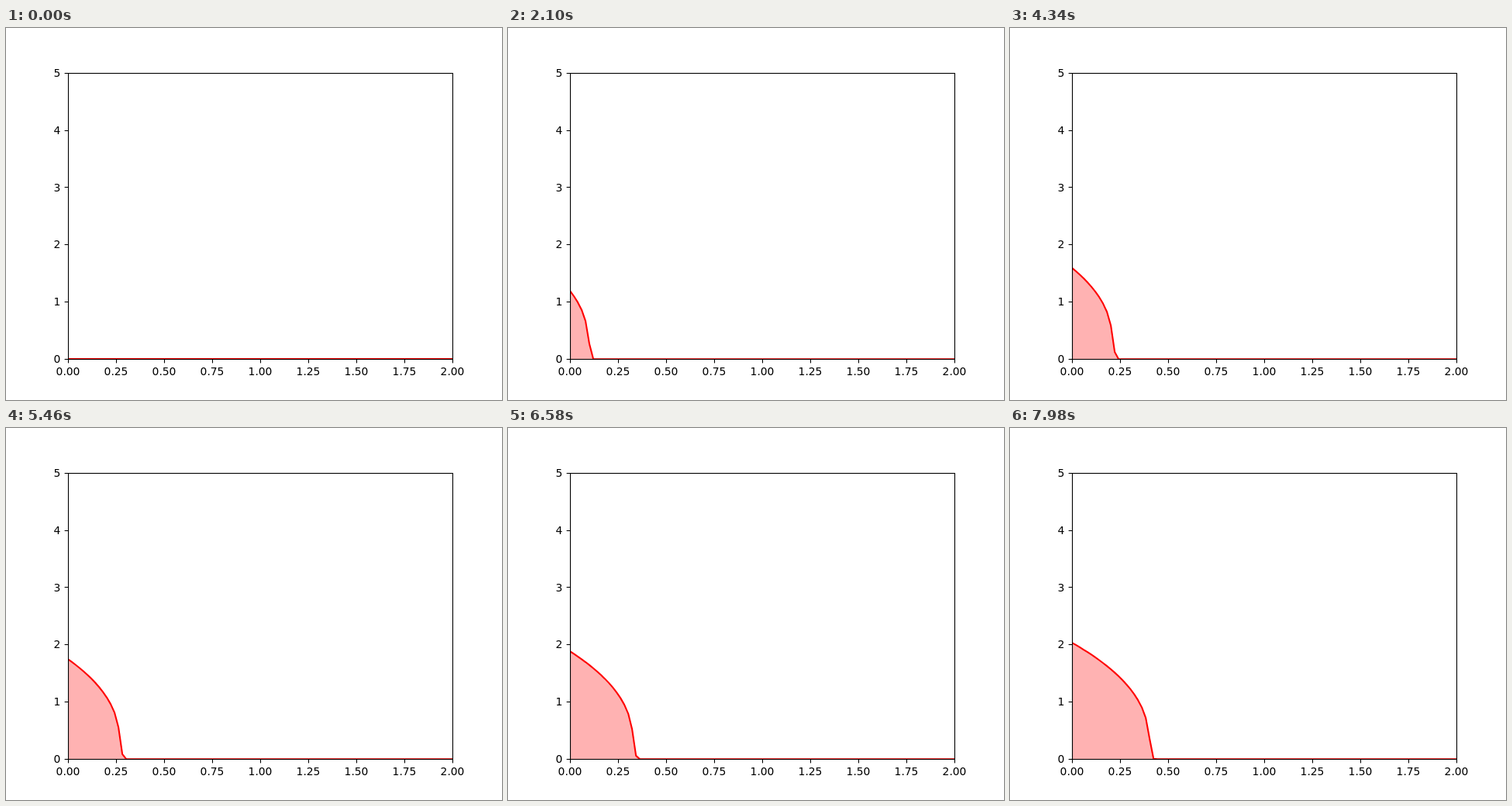
Animation of 640 by 480 pixels, one loop 8000 ms. Source, as an HTML page with a canvas:

```html
<!DOCTYPE html>
<html lang="en">
<head>
<meta charset="utf-8">
<title>Nonlinear heat wave</title>
<style>
  html, body { margin: 0; width: 100%; height: 100%; overflow: hidden; background: #fff; }
  canvas { display: block; }
</style>
</head>
<body>
<canvas id="plot" width="640" height="480"></canvas>
<script>
const ctx = document.getElementById('plot').getContext('2d');
const LOOP = 8000, STEP = 140, STEPS = Math.ceil(LOOP / STEP);
const N = 100, DX = 2 / (N - 1);
const SIGMA = 2.5, SPEED = 0.0075, SLOPE = 13.75;
const DIFFUSION = SIGMA * SPEED / SLOPE / DX ** 2;
const px = x => 80 + 248 * x;
const py = y => 427.2 - 73.92 * y;
const snap = v => Math.floor(v + 0.5) + 0.5;

// One implicit step of u_t = (u^sigma u_x)_x with conductivity from the previous state.
function advance(u, left) {
  const k = u.map(v => v ** SIGMA);
  const a = [0], b = [left];
  for (let i = 1; i < N - 1; i++) {
    const lo = DIFFUSION * (k[i - 1] + k[i]) / 2;
    const hi = DIFFUSION * (k[i] + k[i + 1]) / 2;
    const d = 1 + lo + hi - lo * a[i - 1];
    a[i] = hi / d;
    b[i] = (u[i] + lo * b[i - 1]) / d;
  }
  const next = new Array(N).fill(0);
  for (let i = N - 2; i >= 0; i--) next[i] = a[i] * next[i + 1] + b[i];
  return next;
}

const states = [new Array(N).fill(0)];
for (let n = 1; n < STEPS; n++) {
  states.push(advance(states[n - 1], (SLOPE * SPEED * n) ** (1 / SIGMA)));
}

function segment(x1, y1, x2, y2) {
  ctx.beginPath();
  ctx.moveTo(x1, y1);
  ctx.lineTo(x2, y2);
  ctx.stroke();
}

function drawCurve(u, flat) {
  const curve = new Path2D();
  u.forEach((v, i) => curve.lineTo(px(i * DX), flat ? 427 : py(v)));
  const area = new Path2D(curve);
  area.lineTo(px(2), py(0));
  area.lineTo(px(0), py(0));
  ctx.save();
  ctx.beginPath();
  ctx.rect(80, 58, 496, 370);
  ctx.clip();
  ctx.fillStyle = 'rgba(255, 0, 0, 0.3)';
  ctx.fill(area);
  ctx.strokeStyle = '#f00';
  ctx.lineWidth = 2.08;
  ctx.lineJoin = 'round';
  ctx.lineCap = 'square';
  ctx.stroke(curve);
  ctx.restore();
}

function drawAxes() {
  ctx.strokeStyle = ctx.fillStyle = '#000';
  ctx.lineWidth = 1.11;
  ctx.font = '13.89px "DejaVu Sans", sans-serif';
  ctx.strokeRect(80.5, 58.5, 496, 369);
  ctx.textAlign = 'center';
  for (let i = 0; i <= 8; i++) {
    const x = px(i / 4);
    segment(snap(x), 427.5, snap(x), 432.4);
    ctx.fillText((i / 4).toFixed(2), x, 448);
  }
  ctx.textAlign = 'right';
  for (let i = 0; i <= 5; i++) {
    const y = py(i);
    segment(75.6, snap(y), 80.5, snap(y));
    ctx.fillText(i, 70.3, Math.round(y + 5.1));
  }
}

function draw(now) {
  const n = Math.floor(now % LOOP / STEP);
  ctx.fillStyle = '#fff';
  ctx.fillRect(0, 0, 640, 480);
  drawCurve(states[n], n === 0);
  drawAxes();
  requestAnimationFrame(draw);
}
draw(performance.now());
</script>
</body>
</html>
```
